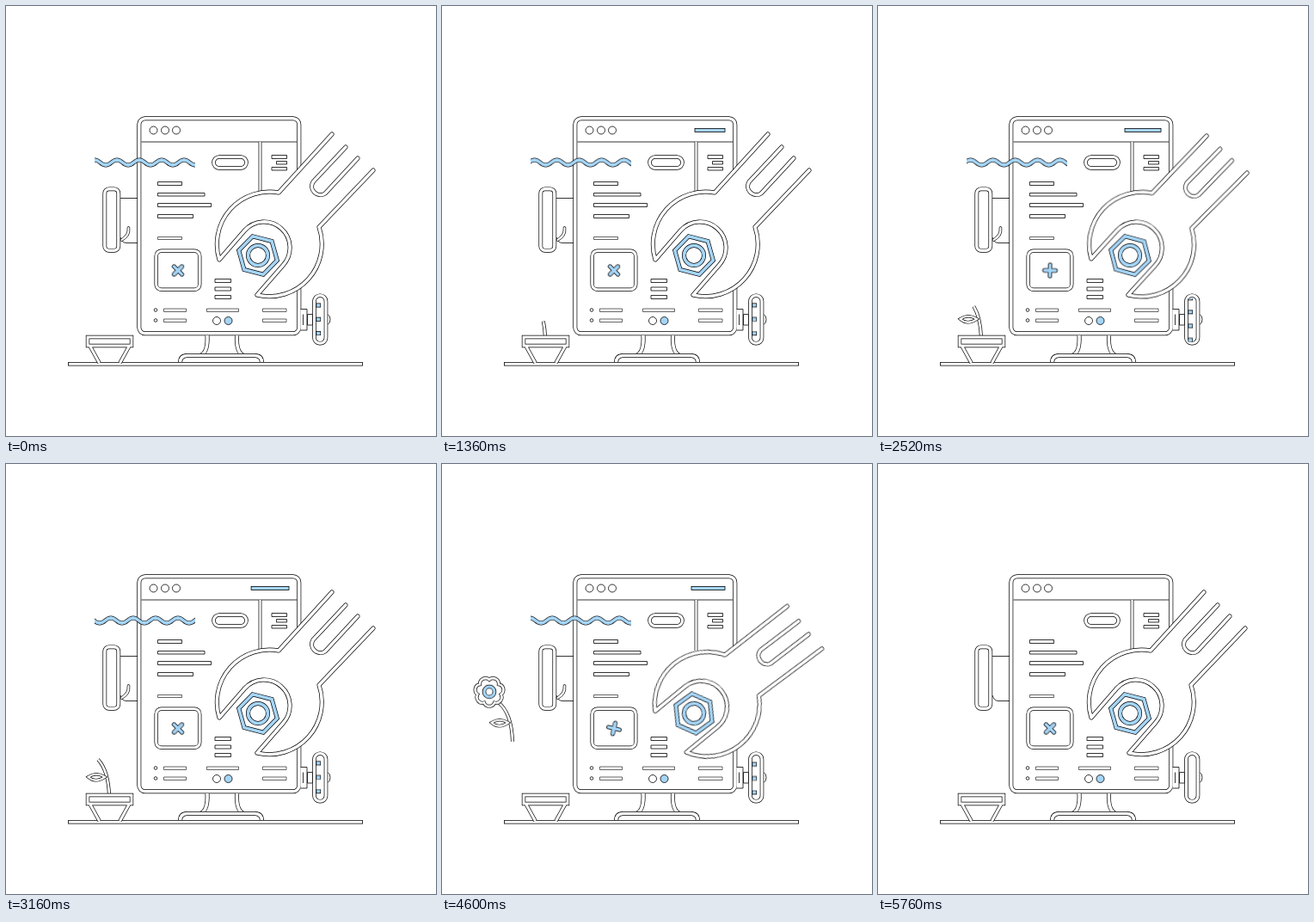
Animation, 500 px wide and 500 px high, one loop 5.8 s. Source, as an HTML page without scripts:

```html
<!DOCTYPE html>
<html lang="en">
<head>
<meta charset="utf-8">
<title>Site maintenance</title>
<style>
html, body { margin: 0; width: 100%; height: 100%; overflow: hidden; background: #fff; }
svg { display: block; width: 100%; height: 100%; }
svg * { animation: 5800ms linear infinite; }

/* A tube is a dark stroke with a lighter one on top */
.o, .i { fill: none; stroke: #000; stroke-width: var(--w, 5px); }
.i { stroke: var(--c, #fff); stroke-width: calc(var(--w, 5px) - 1.4px); }
.blue { --c: #a5d5f7; }
.thin { fill: #fff; stroke: #000; stroke-width: .8px; }
.fill { fill: #a5d5f7; }

.live { animation-name: live; }
.wave { animation-name: wave; animation-duration: 1160ms; }
.wrench { transform-origin: 293px 290px; animation-name: turn; }
.cross { transform-origin: 200px 307.5px; animation-name: spin; }
.ticks { animation-name: ticks; }
.bar { animation-name: bar; }
.drop { animation-name: drop; }
.plant { animation-name: fly; }
.stem { stroke-dasharray: 1 2; animation-name: stem; }
.leaf { transform-origin: 117px 364px; animation-name: leaf; }
.bloom { transform-origin: 93px 328px; animation-name: bloom; }
.ring { stroke-dasharray: 1 2; animation-name: ring; }

@keyframes live { 0%, 99% { visibility: visible; } 99.01%, 100% { visibility: hidden; } }
@keyframes wave { to { transform: translateX(26px); } }
@keyframes turn {
  0%, 11.034%, 22.069%, 31.724%, 42.759%, 53.793%, 63.448%, 74.483%, 85.517%, 100% { transform: rotate(0deg); }
  .69%, 11.724%, 32.414%, 43.448%, 64.138%, 75.172% {
    transform: rotate(1.3deg); animation-timing-function: cubic-bezier(.32, 0, .67, 0);
  }
  7.586%, 18.621%, 39.31%, 50.345%, 71.034%, 82.069% {
    transform: rotate(39deg); animation-timing-function: cubic-bezier(.37, 0, .63, 1);
  }
}
@keyframes spin {
  0%, 31.034%, 62.069% { transform: rotate(0deg); animation-timing-function: cubic-bezier(.37, 0, .63, 1); }
  21.379%, 31.033%, 52.414%, 62.068%, 83.448%, 100% { transform: rotate(360deg); }
}
@keyframes ticks {
  0%, 31.034%, 62.069% { transform: translateY(0); animation-timing-function: cubic-bezier(.37, 0, .63, 1); }
  18.621%, 31.033%, 49.655%, 62.068%, 80.69%, 100% { transform: translateY(-97.8px); }
}
@keyframes bar {
  0%, .3% { x: 329px; width: 0; visibility: hidden; animation-timing-function: ease-out; }
  11.724% { x: 302px; width: 27px; visibility: visible; }
  23.448% { x: 294px; width: 35px; }
  43.448% { x: 287px; width: 42px; }
  58% { x: 284.5px; width: 44.5px; }
  68.966% { x: 285px; width: 44px; }
  79.31% { x: 290px; width: 39px; visibility: visible; animation-timing-function: ease-in; }
  98.5%, 100% { x: 329px; width: 0; visibility: hidden; }
}
@keyframes drop {
  0%, 7.5% { transform: translate(135px, 276px) scale(0); }
  8.5% { transform: translate(135px, 280px) scale(1); animation-timing-function: cubic-bezier(.3, .15, .7, .6); }
  11.724% { transform: translate(135px, 317px) scale(1); }
  15.2% { transform: translate(135px, 391px) scale(1); }
  15.3%, 100% { transform: translate(135px, 391px) scale(0); }
}
@keyframes stem {
  0%, 18% { stroke-dashoffset: 1; }
  23.448% { stroke-dashoffset: .62; }
  43.448% { stroke-dashoffset: .25; }
  63%, 100% { stroke-dashoffset: 0; }
}
@keyframes leaf {
  0%, 33% { transform: scale(0); animation-timing-function: ease-out; }
  43%, 100% { transform: scale(1); }
}
@keyframes bloom {
  0%, 62% { transform: scale(0); animation-timing-function: ease-out; }
  66.2% { transform: scale(1.18); animation-timing-function: ease-in-out; }
  69%, 100% { transform: scale(1); }
}
@keyframes ring {
  0%, 64% { stroke-dashoffset: 1; }
  68.966% { stroke-dashoffset: .25; }
  71%, 100% { stroke-dashoffset: 0; }
}
@keyframes fly {
  0%, 73.5% { transform: translate(0, 0); opacity: 1; animation-timing-function: ease-in; }
  79.31% { transform: translate(-38px, -63px); }
  82.759% { transform: translate(-47px, -108px); }
  88% { transform: translate(-26px, -205px); animation-timing-function: ease-out; }
  93.1% { transform: translate(20px, -274px); opacity: 1; }
  98%, 100% { transform: translate(26px, -274px); opacity: 0; }
}
</style>
</head>
<body>
<svg viewBox="0 0 500 500">
  <defs>
    <g id="screen">
      <rect x="154.800" y="130.800" width="186" height="250" rx="7"/>
      <path d="M234 383q1 19-7 23M268.500 383q-1 19 7 23"/>
    </g>
    <path id="base" d="M202.500 415q0-8.500 8-8.500h79q8 0 8 8.500"/>
    <path id="split" d="M295.500 158V217"/>
    <rect id="pill" x="241.500" y="175.500" width="38" height="13" rx="6.500"/>
    <rect id="photo" x="174.700" y="284.700" width="50.500" height="45" rx="6"/>
    <path id="floor" d="M72 416.300H415"/>
    <path id="pot" d="M98 396L108.500 415M143 396L132.500 415M95 385H146V395H95Z"/>
    <rect id="tap" x="114.800" y="212.800" width="16" height="71.500" rx="5"/>
    <rect id="valve" x="358.500" y="336.700" width="13.500" height="55.500" rx="6.500"/>
    <path id="hook" d="M142.500 258q1 9-8 14"/>
    <path id="sea" d="M70.500 182q6.500-6 13 0t13 0 13 0 13 0 13 0 13 0 13 0 13 0 13 0 13 0 13 0 13 0 13 0"/>
    <path id="x" d="M200 301V314M193.500 307.500H206.500"/>
    <path id="tick" d="M363.300 345.500V492"/>
    <path id="arm" d="M379 149L317 217A61 61 0 0 0 248 295L277.500 261A30 30 0 0 1 322.500 301L292 336A61 61 0 0 0 364 257L427 191"/>
    <path id="slot" d="M395 164L357 204.500A10 10 0 0 0 371 218L409 177"/>
    <g id="nut">
      <path d="M286.800 267.800L309.100 273.600 315.300 295.700 299.200 312.200 276.900 306.400 270.700 284.300Z"/>
      <circle cx="293" cy="290" r="11.500"/>
    </g>
    <path id="stalk" pathLength="1" d="M120 386Q119 352 103 340"/>
    <path id="blade" d="M115 364Q105 357.500 95.500 364 104 371.500 115 364Z"/>
    <path id="petals" transform="translate(93 328)" d="M0-14A6.500 6.500 0 0 1 10.900-8.700 6.500 6.500 0 0 1 13.600 3.100 6.500 6.500 0 0 1 6.100 12.600 6.500 6.500 0 0 1-6.100 12.600 6.500 6.500 0 0 1-13.600 3.100 6.500 6.500 0 0 1-10.900-8.700 6.500 6.500 0 0 1 0-14Z"/>
    <circle id="eye" pathLength="1" cx="93" cy="328" r="6"/>
    <clipPath id="sea-box"><rect x="103" y="172" width="117" height="20"/></clipPath>
    <clipPath id="tick-box"><rect x="359" y="340" width="9" height="51"/></clipPath>
  </defs>

  <!-- Monitor -->
  <g><use href="#screen" class="o"/><use href="#screen" class="i"/></g>
  <g><use href="#base" class="o"/><use href="#base" class="i"/></g>
  <path class="thin" d="M157.500 158H338"/>
  <g style="--w:3.800px"><use href="#split" class="o"/><use href="#split" class="i"/></g>
  <g style="--w:4.500px">
    <use href="#floor" class="o"/><use href="#floor" class="i"/>
    <use href="#pill" class="o"/><use href="#pill" class="i"/>
    <use href="#photo" class="o"/><use href="#photo" class="i"/>
  </g>
  <path class="thin" d="M72.500 414.500V418M414.500 414.500V418"/>
  <g class="thin">
    <circle cx="171.500" cy="144.500" r="4.500"/><circle cx="185" cy="144.500" r="4.500"/><circle cx="198" cy="144.500" r="4.500"/>
    <circle cx="245" cy="366" r="4.500"/><circle cx="258.500" cy="366" r="4.500" class="fill"/>
    <circle cx="174" cy="353.500" r="1.800"/><circle cx="174" cy="365.500" r="1.800"/>
    <path d="M176.500 204.500h28v4h-28zM176.500 217.500h54.500v3.500h-54.500zM176.500 229.500h62v4h-62zM176.500 242.500h41v4h-41z"/>
    <path d="M309 173.500h17.500v4h-17.500zM314.500 180.500h12v3.500h-12zM309 187.500h17.500v3.500h-17.500z"/>
    <path d="M243 317.500h18.500v4h-18.500zM243 327h18.500v4h-18.500zM243 336.500h18.500v4h-18.500z"/>
    <path stroke-width=".6" d="M176.500 268.500h28v3h-28zM183.500 352h26v3.500h-26zM183.500 364h26v3.500h-26zM233.500 352h37v3.500h-37zM298.500 352h27.500v3.500h-27.500zM298.500 364h27.500v3.500h-27.500z"/>
  </g>
  <rect class="thin fill bar" x="329" y="142.500" width="0" height="4"/>
  <g class="cross"><g class="blue" transform="rotate(45 200 307.500)" stroke-linecap="round">
    <use href="#x" class="o"/><use href="#x" class="i"/>
  </g></g>

  <!-- Tap and valve -->
  <path class="thin" d="M133 223.500H153M133 269q2 6.500 7 6.500H153" style="fill:none"/>
  <g style="--w:4.800px"><use href="#tap" class="o"/><use href="#tap" class="i"/></g>
  <path class="thin" d="M342.500 352.500H350V377H342.500M345.500 358.500V371M350.500 358.500H356.500V371H350.500ZM374 358.500Q377 360 377 364.500T374 370.500"/>
  <g style="--w:4.600px"><use href="#valve" class="o"/><use href="#valve" class="i"/></g>
  <g class="live">
    <g style="--w:3.600px" stroke-linecap="round"><use href="#hook" class="o"/><use href="#hook" class="i"/></g>
    <g clip-path="url(#tick-box)"><g class="ticks blue" style="--w:5.600px">
      <use href="#tick" class="o" stroke-dasharray="5 11.300"/>
      <use href="#tick" class="i" stroke-dasharray="3.600 12.700" stroke-dashoffset="-.7"/>
    </g></g>
    <g clip-path="url(#sea-box)"><g class="wave blue">
      <use href="#sea" class="o"/><use href="#sea" class="i"/>
    </g></g>
  </g>

  <!-- Wrench and nut -->
  <g class="wrench">
    <use href="#arm" fill="#fff"/>
    <g stroke-linecap="round" stroke-linejoin="round">
      <use href="#arm" class="o"/><use href="#arm" class="i"/>
      <use href="#slot" class="o"/><use href="#slot" class="i"/>
    </g>
    <g class="blue"><use href="#nut" class="o"/><use href="#nut" class="i"/></g>
  </g>

  <!-- Watering and flower -->
  <g class="drop">
    <path class="thin fill" d="M0-8Q5.500-1 5.500 2.500A5.500 5.500 0 0 1-5.500 2.500Q-5.500-1 0-8Z"/>
    <path class="thin" d="M0-2Q2 1 2 2.500A2 2 0 0 1-2 2.500Q-2 1 0-2Z"/>
  </g>
  <g class="plant" style="--w:4px">
    <g class="stem"><use href="#stalk" class="o"/><use href="#stalk" class="i"/></g>
    <g class="leaf" style="--w:3.600px"><use href="#blade" class="o"/><use href="#blade" class="i"/></g>
    <g class="bloom">
      <use href="#petals" fill="#fff"/>
      <use href="#petals" class="o"/><use href="#petals" class="i"/>
      <g class="ring blue" style="--w:4.600px"><use href="#eye" class="o"/><use href="#eye" class="i"/></g>
    </g>
  </g>
  <path fill="#fff" d="M93 383H148V396L135 414H106L93 396Z"/>
  <g style="--w:4.400px"><use href="#pot" class="o"/><use href="#pot" class="i"/></g>
</svg>
</body>
</html>
```
